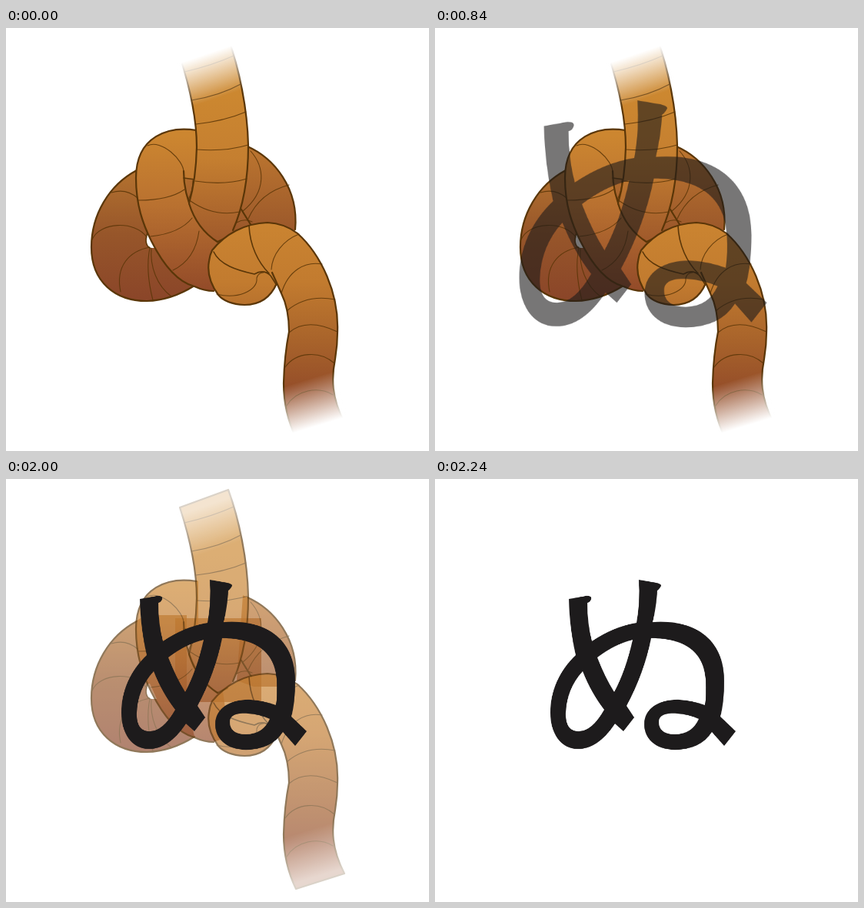
Recreate the animation shown at these times as an HTML page. Size 550 px wide and 550 px high, loop 3000 ms.

```html
<!DOCTYPE html>
<html lang="ja">
<head>
<meta charset="utf-8">
<title>ぬ</title>
<style>
  html, body { margin: 0; width: 100%; height: 100%; overflow: hidden; background: #fff; }
  svg { display: block; width: 100%; height: 100%; }

  .part { animation: fade 3s infinite; }
  .edge, .ring { fill: none; stroke: #5a3608; stroke-linecap: round; stroke-linejoin: round; }
  .edge { stroke-width: 2.2; }
  .fold { stroke-width: 1.6; }
  .ring { stroke-width: 1.1; stroke-opacity: .85; }

  .kana {
    fill: #1d1b1c;
    fill-rule: evenodd;
    transform-origin: 270.5px 241px;
    animation: land 3s infinite;
  }

  @keyframes land {
    0%, 21.333% { opacity: 0; transform: scale(1.839); animation-timing-function: steps(10, start); }
    34.666%, 100% { opacity: 1; transform: none; }
  }
  /* Every part fades on its own, so the overlaps show through. */
  @keyframes fade {
    0%, 63.999% { opacity: 1; animation-timing-function: steps(9, start); }
    75.999%, 100% { opacity: 0; }
  }
</style>
</head>
<body>
<svg viewBox="0 0 550 550" role="img" aria-label="ぬ">
  <defs>
    <linearGradient id="stem" gradientUnits="userSpaceOnUse" x1="0" y1="60" x2="0" y2="278">
      <stop stop-color="#ce8a30"/><stop offset=".5" stop-color="#c57f30"/><stop offset="1" stop-color="#9f592b"/>
    </linearGradient>
    <linearGradient id="band" gradientUnits="userSpaceOnUse" x1="0" y1="140" x2="0" y2="340">
      <stop stop-color="#cc8630"/><stop offset=".45" stop-color="#b97130"/><stop offset="1" stop-color="#934b29"/>
    </linearGradient>
    <linearGradient id="left" gradientUnits="userSpaceOnUse" x1="0" y1="185" x2="0" y2="350">
      <stop stop-color="#b4722f"/><stop offset=".5" stop-color="#97562a"/><stop offset="1" stop-color="#8b4629"/>
    </linearGradient>
    <linearGradient id="right" gradientUnits="userSpaceOnUse" x1="0" y1="165" x2="0" y2="275">
      <stop stop-color="#b9732f"/><stop offset="1" stop-color="#98552a"/>
    </linearGradient>
    <linearGradient id="tail" gradientUnits="userSpaceOnUse" x1="0" y1="255" x2="0" y2="470">
      <stop stop-color="#ca8431"/><stop offset=".35" stop-color="#c27b2f"/>
      <stop offset=".68" stop-color="#aa652b"/><stop offset="1" stop-color="#954e29"/>
    </linearGradient>
    <linearGradient id="mistTop" gradientUnits="userSpaceOnUse" x1="260" y1="34" x2="279" y2="90">
      <stop stop-color="#fff"/><stop offset="1" stop-color="#fff" stop-opacity="0"/>
    </linearGradient>
    <linearGradient id="mistEnd" gradientUnits="userSpaceOnUse" x1="405" y1="517" x2="387" y2="458">
      <stop stop-color="#fff"/><stop offset="1" stop-color="#fff" stop-opacity="0"/>
    </linearGradient>
  </defs>

  <rect class="part" x="220" y="181" width="112" height="109" fill="url(#right)"/>

  <g class="part">
    <path fill="url(#right)" d="M308 151L316 155C348 169 381 208 376 262L374 270H322L300 262Z"/>
    <path class="edge" d="M314 154C348 169 381 208 376 262M306 236L319 257"/>
    <path class="ring" d="M318 160C336 180 340 212 308 238M368 204Q330 214 315 248M300 253Q310 247 320 252M243 198Q243 212 237 223"/>
  </g>

  <g class="part">
    <path fill="url(#left)" fill-rule="evenodd" d="M235 177H183C140 197 111 240 111 285C111 330 142 355 183 355Q215 354 245 335L235 290ZM184 266Q179 281 187 286H196L187 266Z"/>
    <path class="edge" d="M170 185C134 204 111 243 111 285C111 330 142 355 183 355Q215 354 245 335"/>
    <path class="edge fold" d="M184 266Q179 281 187 286"/>
    <path class="ring" d="M137 214Q156 208 171 221M112 275C122 252 168 250 183 272M149 343C142 310 160 290 187 285M191 354Q181 315 187 286M215 349C196 335 187 310 189 286"/>
  </g>

  <g class="part">
    <path fill="url(#band)" d="M250 133C212 127 169 140 169 195C169 230 178 255 189 277C203 305 222 330 245 336Q258 342 270 342L290 335L282 276L275 278C250 262 231 225 231 196H250Z"/>
    <path class="edge" d="M248 133C212 127 169 140 169 195C169 230 178 255 189 277C203 305 222 330 245 336Q258 342 270 342M275 278C250 262 231 225 231 186"/>
    <path class="ring" d="M184 153C202 144 231 172 231 187M172 224Q212 224 232 210M188 271Q226 267 242 247M217 315Q246 301 251 264"/>
    <path class="edge fold" d="M231 195L246 197"/>
  </g>

  <g class="part">
    <path fill="url(#stem)" d="M226 37C240 80 248 118 248 155Q247 197 238 228Q248 261 275 278Q288 276 295 263Q315 218 315 153C314 105 303 52 289 14Z"/>
    <path class="edge" d="M238 228Q247 197 248 155C248 118 240 80 226 37L289 14C303 52 314 105 315 153Q315 218 295 263M238 228Q248 261 275 278L288 272"/>
    <path class="ring" d="M232 57Q270 48 296 36M241 94Q278 88 305 73M247 125Q284 121 312 109M248 158Q285 161 315 152M246 199Q284 205 313 196M240 225Q270 246 304 239"/>
  </g>

  <g class="part">
    <path fill="url(#tail)" d="M268 289C285 268 310 254 340 253Q362 254 379 267C410 295 433 345 431 395Q431 412 428 430C423 455 423 480 440 513L377 533Q361 500 361 462Q362 425 368 395Q368 365 358 345L352 332Q340 360 310 360Q286 359 276 347Q260 325 264 303Q265 295 268 289Z"/>
    <path class="edge" d="M352 332Q340 360 310 360Q286 359 276 347Q260 325 264 303Q265 295 268 289C285 268 310 254 340 253Q362 254 379 267C410 295 433 345 431 395Q431 412 428 430C423 455 423 480 440 513L377 533Q361 500 361 462Q362 425 368 395Q368 365 358 345L346 318"/>
    <path class="edge fold" d="M316 257C317 283 328 305 342 319M270 291C278 308 300 315 323 320Q335 313 344 322L351 333"/>
    <path class="ring" d="M274 346C300 353 328 342 326 325Q328 318 335 318M345 314C346 295 360 276 381 268M358 345C367 315 389 303 411 307M365 368Q390 346 428 353M368 396Q391 376 431 395M363 441C377 421 408 419 427 436M365 491C377 471 406 465 425 477"/>
  </g>

  <path class="part" fill="url(#mistTop)" d="M217 36L290 8L316 78L242 105Z"/>
  <path class="part" fill="url(#mistEnd)" d="M351 470L428 446L447 514L374 540Z"/>

  <path class="kana" d="M174 156L197 152Q204 152 203 156Q202 160 198 161Q198 188 204 211Q232 192 262 187Q267 160 265 131L288 135Q295 137 294 139Q291 144 289 145Q288 165 283 186C340 182 376 210 376 262Q376 290 371 309L391 328L376 347L360 329Q345 352 312 352C285 352 272 336 272 319C272 296 295 286 318 287Q335 288 351 294Q353 280 352 262C350 225 325 207 281 207Q272 252 249 295L259 310L245 328L234 318Q212 351 186 351C163 351 150 330 150 304C150 275 162 249 183 229Q175 195 174 156Z
    M192 250Q203 278 220 300Q204 328 187 328C173 328 170 317 170 305Q171 273 192 250Z
    M211 232Q221 258 233 277Q248 249 257 209Q233 215 211 232Z
    M291 316C291 306 302 304 315 305Q330 306 343 312Q334 332 312 332C298 332 291 326 291 316Z"/>
</svg>
</body>
</html>
```
